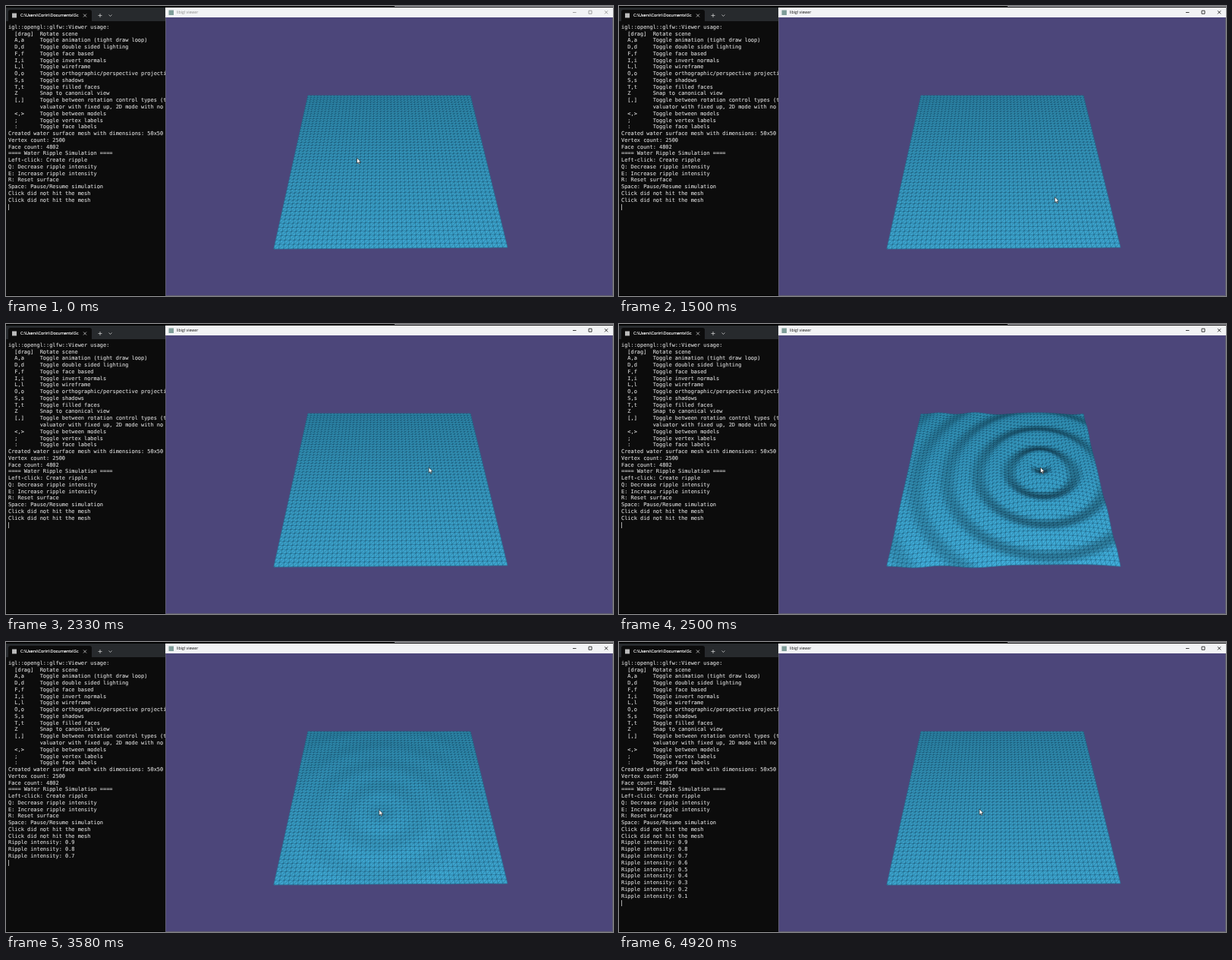
An HTML page with a canvas for the animation above (5000 ms loop, 800 by 382 pixels).

```html
<!DOCTYPE html>
<html lang="en">
<head>
<meta charset="utf-8">
<title>Water ripple simulation</title>
<style>
html, body { margin: 0; width: 100%; height: 100%; overflow: hidden; background: #000; }
#stage { position: relative; width: 800px; height: 382px; overflow: hidden; }
#stage * { position: absolute; margin: 0; white-space: pre; }
#term { left: 0; top: 2px; width: 210px; height: 379px; background: #0c0c0c; overflow: hidden; }
#tabs { left: 0; top: 0; width: 210px; height: 18px; background: #272a2d; }
#tab { left: 3px; top: 3px; width: 110px; height: 15px; background: #0c0c0c; border-radius: 3px 3px 0 0; }
#path { left: 19px; top: 6px; width: 77px; overflow: hidden; color: #fff;
  font: 5.5px/9px "Open Sans", sans-serif; -webkit-text-stroke: .15px; }
#log { left: 3px; top: 21.8px; color: #d8d8d8; font: 6.93px/8.77px "DejaVu Sans Mono", monospace;
  -webkit-text-stroke: .12px; }
#caret { left: 3px; width: 1px; height: 8px; background: #aaa; }
#bar { left: 210px; top: 2px; width: 590px; height: 13px; background: #f2f3f5; }
#name { left: 15px; top: 2px; font: 5.2px/9px "Open Sans", sans-serif; }
canvas, svg { left: 0; top: 0; }
</style>
</head>
<body>
<div id="stage">
  <div id="term">
    <div id="tabs"><div id="tab"></div><div id="path">C:\Users\Corin\Documents\Sc</div></div>
    <div id="log"></div>
    <div id="caret"></div>
  </div>
  <canvas id="view" width="800" height="382"></canvas>
  <div id="bar"><div id="name">libigl viewer</div></div>
  <svg width="800" height="382" fill="none" stroke-width=".8">
    <path d="M512 .5H800" stroke="#b4b4ba" stroke-width="1"/>
    <path d="M210.500 15V381.500H799.500V15" stroke="#5f5d70" stroke-width="1"/>
    <path d="M8 9.500h6v6h-6z" fill="#bbb"/>
    <path d="M102 10.500l4 4m0-4l-4 4M121.500 12.500h5m-2.500-2.500v5M135.500 11.500l2 2 2-2" stroke="#ccc"/>
    <path d="M214.500 5.500h6.500v6.500h-6.500z" fill="#7f9d99"/>
    <path id="buttons" d="M747 8.500h4.500M768 6.200h4v4h-4zM789 6.200l4.200 4.200m0-4.200l-4.200 4.200"/>
    <path id="mouse" d="M0 0V7.400L1.700 5.900 2.800 8.400 4 7.900 2.900 5.500H5.200Z" fill="#fff" stroke="#111" stroke-width=".6"/>
  </svg>
</div>
<script>
const $ = id => document.getElementById(id);
const ctx = $('view').getContext('2d');
const N = 50, LOOP = 5000, FPS = 12, CELL = 1 / (N - 1);
const FIRST_CLICK = .18, CLICK_GAP = .455, FADE = .15;
const FIRST_DROP = 2.91, DROP_GAP = .226;
const clamp = (x, lo, hi) => Math.max(lo, Math.min(hi, x));

const usage = `igl::opengl::glfw::Viewer usage:
  [drag]  Rotate scene
  A,a     Toggle animation (tight draw loop)
  D,d     Toggle double sided lighting
  F,f     Toggle face based
  I,i     Toggle invert normals
  L,l     Toggle wireframe
  O,o     Toggle orthographic/perspective projection
  S,s     Toggle shadows
  T,t     Toggle filled faces
  Z       Snap to canonical view
  [,]     Toggle between rotation control types (trackball
          valuator with fixed up, 2D mode with no
  <,>     Toggle between models
  ;       Toggle vertex labels
  :       Toggle face labels
Created water surface mesh with dimensions: 50x50
Vertex count: 2500
Face count: 4802
==== Water Ripple Simulation ====
Left-click: Create ripple
Q: Decrease ripple intensity
E: Increase ripple intensity
R: Reset surface
Space: Pause/Resume simulation
Click did not hit the mesh
Click did not hit the mesh`.split('\n');

// Places where the pointer rests: time, x, y
const stops = [
  [0, 462.5, 200], [.63, 459, 197.5], [1.48, 574.5, 252], [1.83, 562, 207],
  [2.4, 557, 188], [3.5, 492.5, 221], [4.2, 475, 220]
];

function pointer(t) {
  const next = stops.findIndex(s => s[0] > t);
  const i = next < 0 ? stops.length - 1 : next;
  const [t0, x0, y0] = stops[i - 1], [t1, x1, y1] = stops[i];
  const k = clamp((t - t0) / (t1 - t0), 0, 1), e = k * k * (3 - 2 * k);
  return [x0 + (x1 - x0) * e, y0 + (y1 - y0) * e];
}

const dropCount = t => clamp(Math.floor((t - FIRST_DROP) / DROP_GAP) + 1, 0, 9);

// Perspective of the water plane; u and v run 0..1, v toward the viewer
function project(u, v, z) {
  const d = 1 - .305 * v;
  return [(398 - 152.7 * v + 214 * u) / d, (118 + 104.4 * v - 1.4 * u * v - 3.6 * z) / d];
}

function unproject(x, y) {
  const v = (y - 118) / (104.4 + .305 * y);
  return [(x * (1 - .305 * v) - 398 + 152.7 * v) / 214, v];
}

// The pointer clicks at a steady beat; each ripple dies away quickly
function ripplesAt(t) {
  const ripples = [];
  for (let t0 = FIRST_CLICK; t0 <= t; t0 += CLICK_GAP) {
    const age = t - t0, [u, v] = unproject(...pointer(t0));
    const amp = (1 - dropCount(t0) / 10) * Math.exp(-((age / FADE) ** 2));
    if (amp > .03) ripples.push({ i: u / CELL, j: v / CELL, amp, phase: 3 * age });
  }
  return ripples;
}

function height(i, j, ripples) {
  let z = 0;
  for (const r of ripples) {
    const dist = Math.hypot(i - r.i, j - r.j);
    z -= r.amp * Math.exp(-.035 * dist) * Math.cos(dist * Math.PI / 4 - r.phase);
  }
  return z;
}

function drawWater(t) {
  const ripples = ripplesAt(t), z = [], p = [];
  for (let j = 0; j < N; j++) for (let i = 0; i < N; i++) {
    const h = height(i, j, ripples);
    z.push(h);
    p.push(project(i * CELL, j * CELL, h));
  }
  const wires = new Path2D();
  const line = (a, b) => { wires.moveTo(...p[a]); wires.lineTo(...p[b]); };

  ctx.lineWidth = .7;
  for (let j = 0; j < N; j++) for (let i = 0; i < N; i++) {
    const a = j * N + i, b = a + 1, c = a + N, d = c + 1;
    if (i < N - 1) line(a, b);
    if (j < N - 1) line(a, c);
    if (i == N - 1 || j == N - 1) continue;
    line(b, c);
    const slope = (z[c] + z[d] - z[a] - z[b]) / 2;
    const mean = (z[a] + z[b] + z[c] + z[d]) / 4;
    const light = clamp(1 - .7 * slope + .3 * mean, .35, 1.05);
    const v = j * CELL;
    ctx.fillStyle = ctx.strokeStyle =
      `rgb(${(47 + 14 * v) * light},${(141 + 24 * v) * light},${(176 + 31 * v) * light})`;
    ctx.beginPath();
    for (const k of [a, b, d, c]) ctx.lineTo(...p[k]);
    ctx.closePath();
    ctx.fill();
    ctx.stroke();
  }
  ctx.lineWidth = .5;
  ctx.strokeStyle = 'rgba(4,22,36,.45)';
  ctx.stroke(wires);
}

function draw(t) {
  ctx.fillStyle = '#4c467a';
  ctx.fillRect(210, 14, 590, 368);
  drawWater(t);

  const [x, y] = pointer(t);
  $('mouse').setAttribute('transform', `translate(${x} ${y})`);

  const lines = [...usage];
  for (let i = 1; i <= dropCount(t); i++) lines.push(`Ripple intensity: 0.${10 - i}`);
  $('log').textContent = lines.join('\n');
  $('caret').style.top = 22.3 + lines.length * 8.77 + 'px';

  const ink = t < .16 ? '#8c8c8c' : '#111';
  $('name').style.color = ink;
  $('buttons').style.stroke = ink;
}

let last = -1;
function tick() {
  const step = Math.floor(((performance.now() + 4) % LOOP) * FPS / 1000);
  if (step != last) draw((last = step) / FPS);
  requestAnimationFrame(tick);
}
tick();
</script>
</body>
</html>
```
